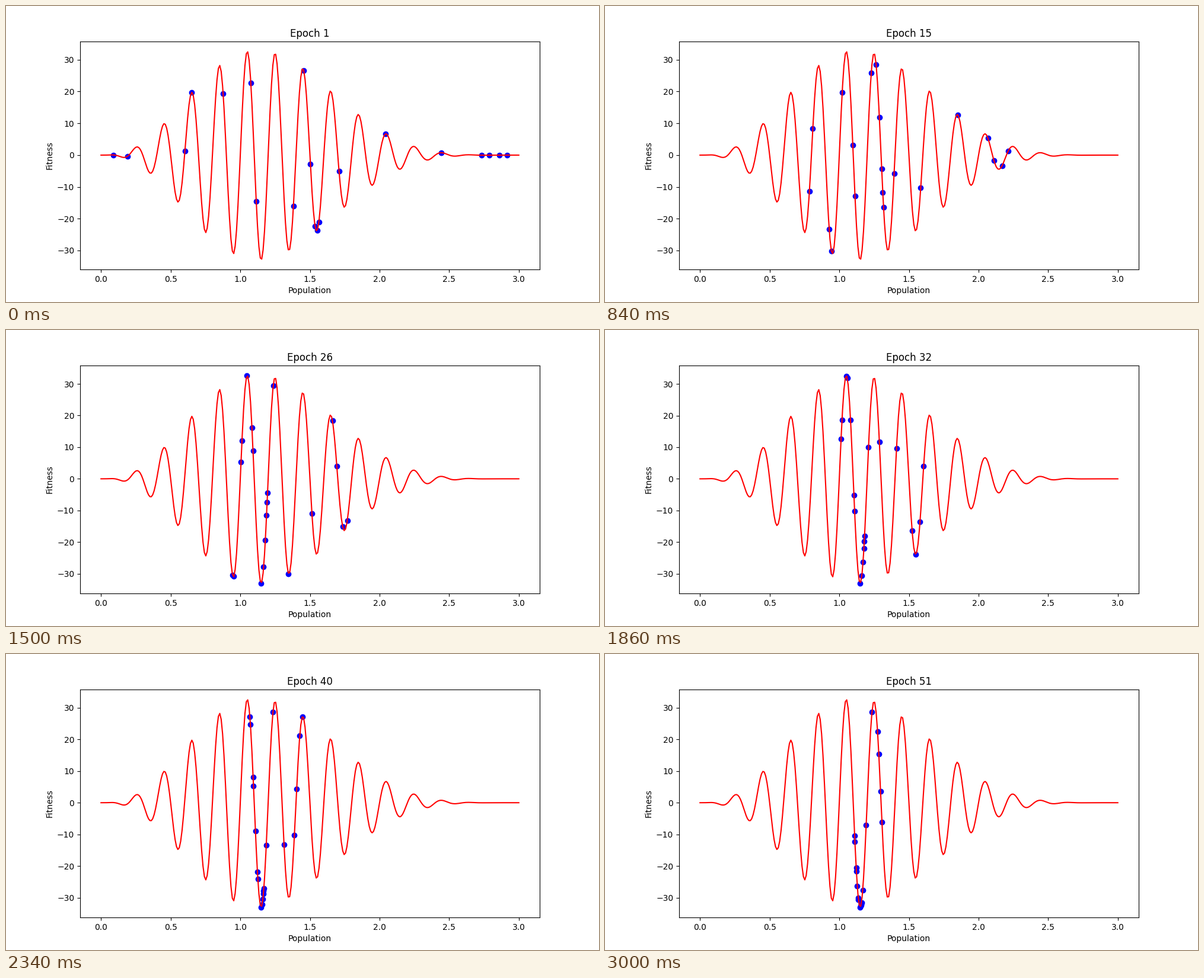
A matplotlib script for the animation above (3060 ms loop, 1000 px wide and 500 px high).

```python
import matplotlib.pyplot as plt
import numpy as np
from matplotlib.animation import FuncAnimation

EPOCHS = 51
STEP_MS = 60

START = np.array([.0890, .1890, .6023, .6510, .8769, 1.0758, 1.1146, 1.3815,
                  1.4562, 1.5035, 1.5372, 1.5530, 1.5641, 1.7091, 2.0410,
                  2.4440, 2.7328, 2.7880, 2.8605, 2.9158])

# Attraction stages: first epoch, centre, rate, skew
STAGES = [(0, 1.178, .0607, .39),
          (7, 1.0715, .0675, .45),
          (25, 1.1499, .0632, .41)]


def fitness(x):
    return x**3 * (3 - x)**5 * np.sin(10 * np.pi * x)


def pull(x, centre, rate, skew):
    """Drift towards the centre, weaker for larger x."""
    gap = x - centre
    return -rate * gap * np.exp(-skew * gap)


def evolve():
    x = START
    history = [x]
    for epoch in range(EPOCHS - 1):
        _, *stage = [s for s in STAGES if s[0] <= epoch][-1]
        middle = x + pull(x, *stage) / 2
        x = x + pull(middle, *stage)
        history.append(x)
    return history


history = evolve()

fig, ax = plt.subplots(figsize=(10, 5), dpi=100)
curve_x = np.linspace(0, 3, 300)
curve_y = fitness(curve_x)
ax.plot(curve_x, curve_y, color="red")
dots = ax.scatter([], [], s=36, color="blue")
ax.set_xlim(-0.15, 3.15)
ax.set_xlabel("Population")
ax.set_ylabel("Fitness")


def update(i):
    x = history[i]
    y = fitness(x)
    dots.set_offsets(np.column_stack([x, y]))
    low = min(curve_y.min(), y.min())
    high = max(curve_y.max(), y.max())
    pad = 0.05 * (high - low)
    ax.set_ylim(low - pad, high + pad)
    ax.set_title(f"Epoch {i + 1}")
    return [dots]


anim = FuncAnimation(fig, update, frames=EPOCHS, interval=STEP_MS,
                     init_func=lambda: update(0), repeat=True, repeat_delay=0)
plt.show()
```
